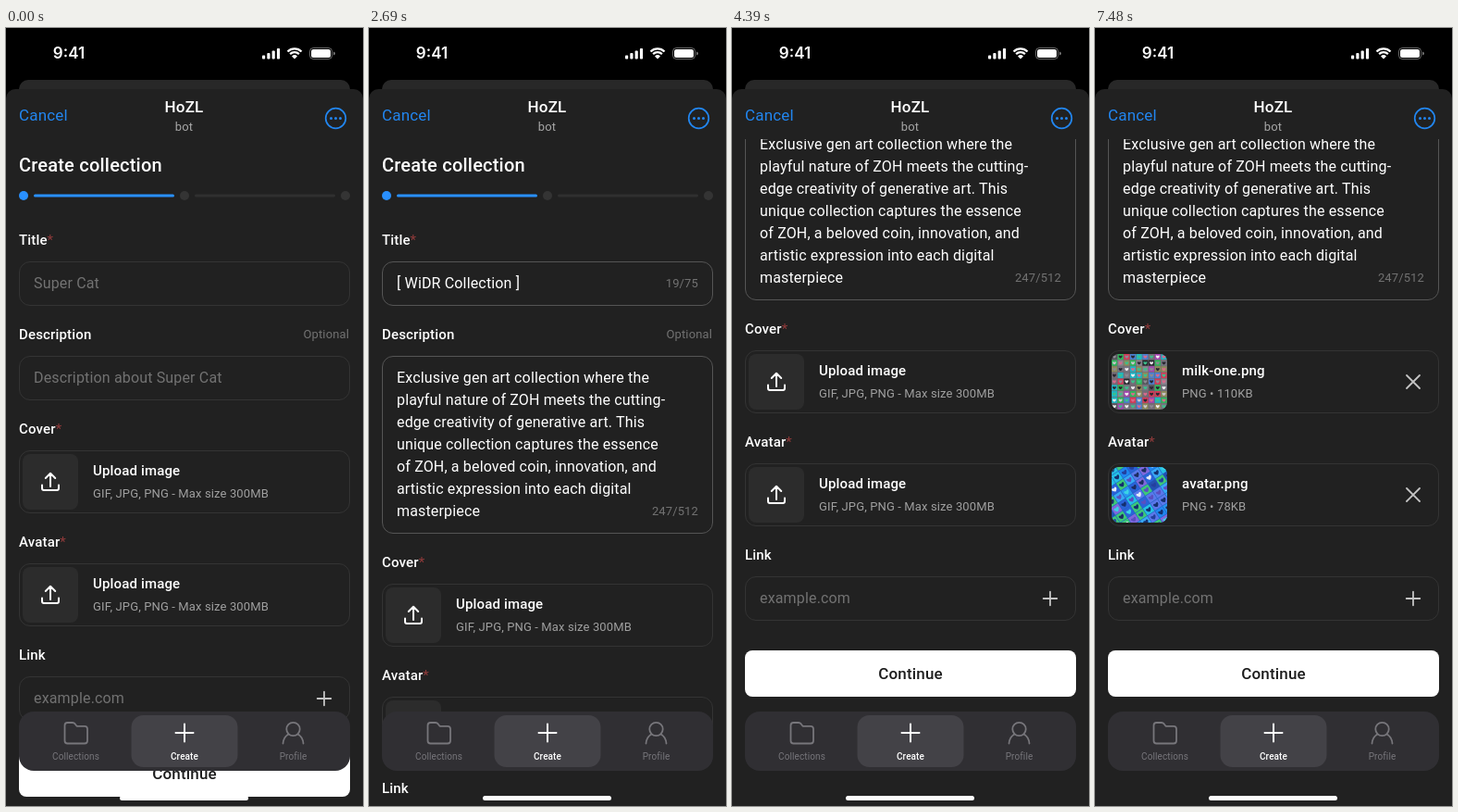
An HTML page for the animation above (8000 ms loop, 386 by 840 pixels).

```html
<!DOCTYPE html>
<html lang="en">
<head>
<meta charset="utf-8">
<title>Create collection</title>
<style>
  html, body { margin: 0; width: 100%; height: 100%; overflow: hidden; background: #000; }
  svg { display: block; width: 100%; height: 100%; }
  text { font-family: Roboto, "Liberation Sans", sans-serif; letter-spacing: .01em; white-space: pre; }
  .time { font-family: Inter, Roboto, sans-serif; letter-spacing: 0; }
</style>
</head>
<body>
<svg id="stage" viewBox="0 0 386 840" xmlns="http://www.w3.org/2000/svg"></svg>
<script>
const LOOP = 8000;
const SHEET = '#212121', BLUE = '#2990ff', LINK = '#2286f0', WHITE = '#fff';
const HINT = '#727272', ACTION = '#c4c4c4', LINE = '#343434', FILLED_LINE = '#555';
const SCROLL = 252, GROWTH = 144;

const STORY = [
  'Exclusive gen art collection where the',
  'playful nature of ZOH meets the cutting-',
  'edge creativity of generative art. This',
  'unique collection captures the essence',
  'of ZOH, a beloved coin, innovation, and',
  'artistic expression into each digital',
  'masterpiece'
];

// Drawing helpers
const text = (x, y, size, str, fill = WHITE, weight = 400, anchor = 'start') =>
  `<text x="${x}" y="${y}" font-size="${size}" font-weight="${weight}" fill="${fill}" text-anchor="${anchor}">${str}</text>`;
const rect = (x, y, w, h, r, fill) =>
  `<rect x="${x}" y="${y}" width="${w}" height="${h}" rx="${r}" fill="${fill}"/>`;
const frame = (y, h, color) =>
  `<rect x="14.5" y="${y + .5}" width="357" height="${h - 1}" rx="11.5" fill="none" stroke="${color}"/>`;
const stroke = (d, color, width = 2) =>
  `<path d="${d}" fill="none" stroke="${color}" stroke-width="${width}" stroke-linecap="round" stroke-linejoin="round"/>`;
const circle = (x, y, r, fill) => `<circle cx="${x}" cy="${y}" r="${r}" fill="${fill}"/>`;
const group = (content, attrs = '') => `<g ${attrs}>${content}</g>`;
const label = (y, str, required) =>
  text(14, y, 15, `${str}${required ? '<tspan fill="#8f3a3a" font-weight="400">*</tspan>' : ''}`, WHITE, 500);
const plus = (x, y, r, color, width) => stroke(`M${x - r} ${y}h${2 * r}M${x} ${y - r}v${2 * r}`, color, width);

function random(seed) {
  return () => (seed = (seed * 16807) % 2147483647) / 2147483647;
}

// Patchwork of heart tiles centred on the origin
function patchwork(count, size, seed, colors, hearts) {
  const next = random(seed);
  const pick = list => list[Math.floor(next() * list.length)];
  let out = '';
  for (let i = 0; i < count * count; i++) {
    const x = (i % count - count / 2) * size, y = (Math.floor(i / count) - count / 2) * size;
    out += rect(x, y, size - .6, size - .6, 0, pick(colors));
    out += `<path transform="translate(${x + size / 2 - .3} ${y + size / 2 - .3}) scale(${size * .32})" fill="${pick(hearts)}" d="M0 .9C-1.5 0-.9-1.2 0-.4C.9-1.2 1.5 0 0 .9Z"/>`;
  }
  return out;
}

const coverArt = rect(-30, -30, 60, 60, 0, '#6a6a70') + patchwork(9, 6.7, 73519,
  ['#777681', '#8a8790', '#1fb5c4', '#2fb85a', '#a445b0', '#d43a58', '#54565c', '#4a7fd0', '#766b76', '#26282e', '#8f8a5a'],
  ['#f0eef0', '#c9c6cc', '#2a2630', '#8d8a93', '#3cc08c', '#d86a8c']);
const avatarArt = rect(-30, -30, 60, 60, 0, '#1e62c4') + group(patchwork(9, 9.6, 51977,
  ['#1f86f0', '#2795ee', '#25c0e4', '#2a62d8', '#5a78ea', '#2da0e0', '#7f68dc', '#3cc878', '#2450b0', '#38a8f4'],
  ['#e4eefa', '#14306f', '#1c2d62', '#3ad3e6', '#23409e', '#5a4fc0']), 'transform="rotate(-33)"');

function upload(y, id, art, name, info) {
  const icon = stroke(`M48 ${y + 39}v-14M42.8 ${y + 30}l5.2-5.2l5.2 5.2M39 ${y + 37.5}v3.5q0 2 2 2h14q2 0 2-2v-3.5`, WHITE);
  const empty = icon + text(94, y + 27, 15, 'Upload image', WHITE, 500)
    + text(94, y + 51, 13, 'GIF, JPG, PNG - Max size 300MB', '#a0a0a0');
  const done = group(group(art, `transform="translate(48 ${y + 34})"`), `clip-path="url(#${id}Clip)"`)
    + text(94, y + 27, 15, name, WHITE, 500) + text(94, y + 51, 13, info, '#a0a0a0')
    + stroke(`M337 ${y + 27}l14 14m0-14l-14 14`, ACTION, 1.8);
  return `<clipPath id="${id}Clip">${rect(18, y + 4, 60, 60, 8, WHITE)}</clipPath>`
    + frame(y, 68, LINE) + rect(18, y + 4, 60, 60, 8, '#2c2c2c')
    + group(empty, `id="${id}Empty"`) + group(done, `id="${id}Done"`);
}

const titleValue = text(30, 281, 16, '[ WiDR Collection ]') + text(356, 280, 13, '19/75', HINT, 400, 'end');

function form(id, filled) {
  const d = filled ? GROWTH : 0;
  const steps = stroke('M31.5 181H180.5', BLUE, 3) + stroke('M205.5 181H354.5', '#303030', 3)
    + circle(19, 181, 5, BLUE) + circle(193, 181, 5, '#343434') + circle(367, 181, 5, '#343434');
  const title = filled
    ? frame(252, 48, FILLED_LINE) + titleValue
    : frame(252, 48, LINE) + group(text(30, 281, 16, 'Super Cat', HINT), 'id="titleEmpty"')
      + group(frame(252, 48, FILLED_LINE) + titleValue, 'id="titleDone"');
  const story = filled
    ? frame(354, 192, FILLED_LINE) + STORY.map((s, i) => text(30, 383 + 24 * i, 16, s)).join('')
      + text(356, 526, 13, '247/512', HINT, 400, 'end')
    : frame(354, 48, LINE) + text(30, 383, 16, 'Description about Super Cat', HINT);
  return group(
    rect(0, 66, 386, 1100, 0, SHEET) + text(14, 155, 20, 'Create collection', WHITE, 500) + steps
    + label(234, 'Title', true) + title
    + label(336, 'Description') + text(371, 335, 13, 'Optional', HINT, 400, 'end') + story
    + label(438 + d, 'Cover', true) + upload(456 + d, id + 'Cover', coverArt, 'milk-one.png', 'PNG • 110KB')
    + label(560 + d, 'Avatar', true) + upload(578 + d, id + 'Avatar', avatarArt, 'avatar.png', 'PNG • 78KB')
    + label(682 + d, 'Link') + frame(700 + d, 48, LINE) + text(30, 729 + d, 16, 'example.com', HINT)
    + plus(344, 724 + d, 7.3, ACTION, 1.8)
    + rect(14, 780 + d, 358, 50, 8, WHITE) + text(193, 811 + d, 17, 'Continue', '#1c1c1c', 500, 'middle'),
    `id="${id}"`);
}

function statusBar() {
  const bars = [4, 6.5, 9, 11.5].map((h, i) => rect(277 + 5.3 * i, 33.5 - h, 3.2, h, .9, WHITE)).join('');
  const arc = (r, w) => {
    const k = r * Math.SQRT1_2;
    return `<path d="M${312 - k} ${33 - k}A${r} ${r} 0 0 1 ${312 + k} ${33 - k}" fill="none" stroke="${WHITE}" stroke-width="${w}"/>`;
  };
  const battery = `<rect x="328.5" y="21.5" width="24" height="12" rx="3.8" fill="none" stroke="${WHITE}" stroke-opacity=".4"/>`
    + rect(330, 23, 21, 9, 2.5, WHITE)
    + `<path d="M354 25.5q2 .6 2 2t-2 2z" fill="${WHITE}" fill-opacity=".45"/>`;
  return `<text class="time" x="68" y="33" font-size="17" font-weight="600" fill="${WHITE}" text-anchor="middle">9:41</text>`
    + bars + arc(10.6, 2.3) + arc(6.9, 2.2) + `<path d="M312 33.4l-3-3a4.3 4.3 0 0 1 6 0z" fill="${WHITE}"/>` + battery;
}

function header() {
  return text(14, 100, 17, 'Cancel', LINK) + text(192.5, 91, 17, 'HoZL', WHITE, 500, 'middle')
    + text(192.5, 111, 13, 'bot', '#a6a6a6', 400, 'middle')
    + `<circle cx="356.5" cy="97.5" r="10.8" fill="none" stroke="${LINK}" stroke-width="1.7"/>`
    + [-5, 0, 5].map(x => circle(356.5 + x, 97.5, 1.5, LINK)).join('');
}

function tabBar() {
  const dim = '#77767b';
  return rect(14, 738, 358, 64, 16, '#302f33') + rect(135.5, 742, 115, 56, 13, '#434247')
    + stroke('M63.5 753q0-3 3-3h5.5q1.5 0 2.5 1.2l2 2.6h8.5q3 0 3 3v12.7q0 3-3 3h-18.5q-3 0-3-3z', dim, 1.8)
    + plus(193, 761, 9.5, WHITE)
    + `<circle cx="310.5" cy="757" r="7.2" fill="none" stroke="${dim}" stroke-width="1.8"/>`
    + stroke('M305.5 762.5q-5.5 3-6 10M315.5 762.5q5.5 3 6 10', dim, 1.8)
    + text(75.5, 790, 10, 'Collections', dim, 400, 'middle')
    + text(193, 790, 10, 'Create', WHITE, 500, 'middle')
    + text(310.5, 790, 10, 'Profile', dim, 400, 'middle');
}

document.getElementById('stage').innerHTML =
  `<clipPath id="body"><rect x="0" y="120" width="386" height="720"/></clipPath>`
  + rect(0, 0, 386, 840, 0, '#000') + statusBar()
  + rect(14, 56, 358, 40, 10, '#282828') + rect(0, 66, 386, 800, 10, SHEET)
  + group(form('short', false) + form('long', true), 'clip-path="url(#body)"')
  + header() + tabBar() + rect(123, 829, 139, 5, 2.5, WHITE);

// Cubic bezier easing with control points (x1, 0) and (x2, 1)
function ease(p, x1, x2) {
  if (p <= 0) return 0;
  if (p >= 1) return 1;
  let lo = 0, hi = 1;
  for (let i = 0; i < 24; i++) {
    const s = (lo + hi) / 2, r = 1 - s;
    if (3 * x1 * s * r * r + 3 * x2 * s * s * r + s * s * s < p) lo = s; else hi = s;
  }
  return lo * lo * (3 - 2 * lo);
}
const easeOut = (t, from, to) => ease((t - from) / (to - from), 0, .58);
const easeInOut = (t, from, to) => ease((t - from) / (to - from), .42, .58);

const parts = {};
document.querySelectorAll('g[id]').forEach(el => parts[el.id] = el);
const fade = (id, a) => parts[id].setAttribute('opacity', a);
function swap(id, a) {
  fade(id + 'Empty', 1 - a);
  fade(id + 'Done', a);
}

function render(t) {
  swap('title', easeOut(t, 485, 680));
  swap('shortCover', 0);
  swap('shortAvatar', 0);
  fade('long', easeOut(t, 2405, 2690));
  parts.long.setAttribute('transform', `translate(0 ${-SCROLL * easeInOut(t, 4150, 4388)})`);
  swap('longCover', easeOut(t, 5495, 5780));
  swap('longAvatar', easeOut(t, 7255, 7480));
}

const start = performance.now();
function tick() {
  render((performance.now() - start) % LOOP);
  requestAnimationFrame(tick);
}
tick();
</script>
</body>
</html>
```
